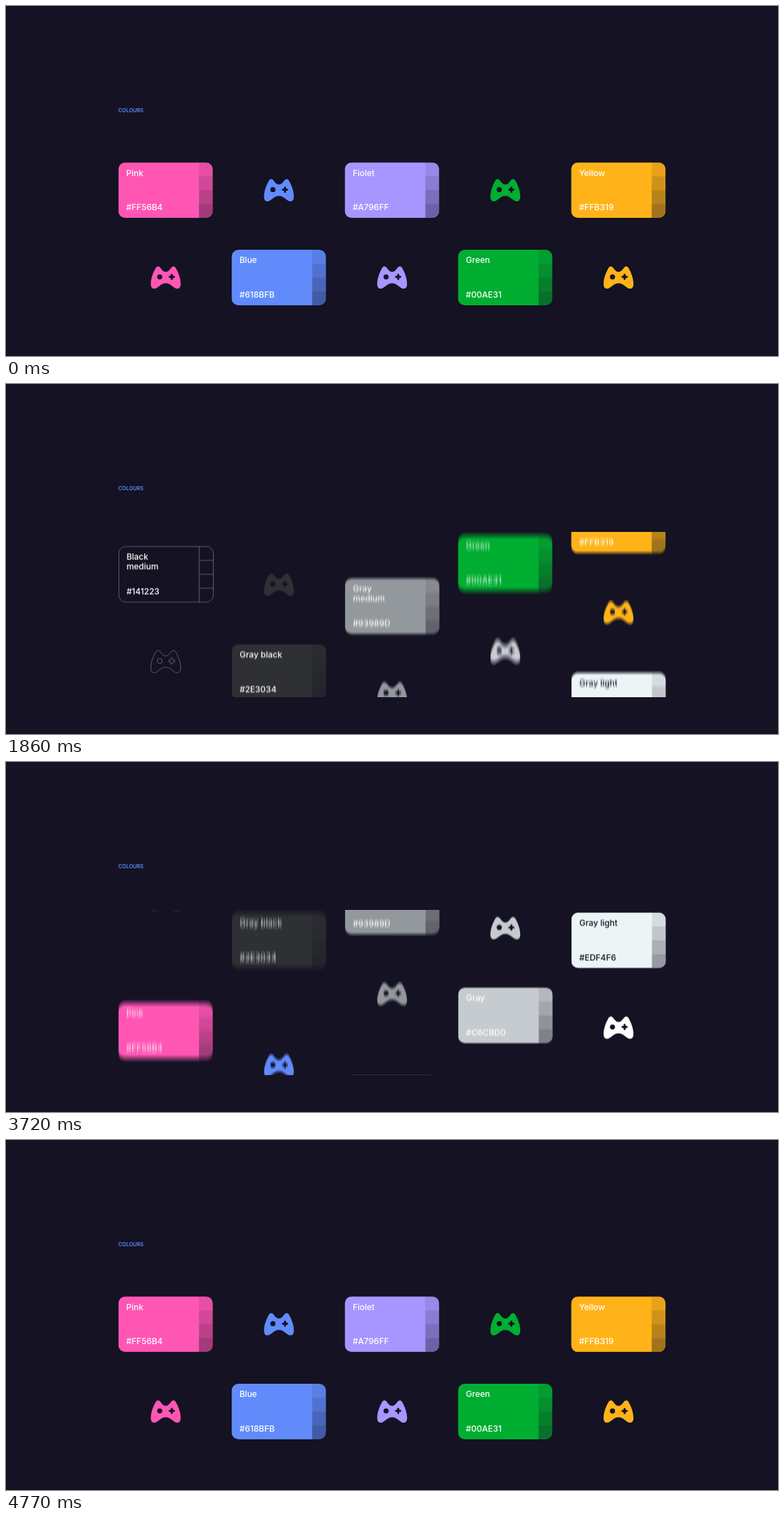
An HTML page for the animation above (4800 ms loop, 1111 px wide and 504 px high).

```html
<!DOCTYPE html>
<html lang="en">
<head>
<meta charset="utf-8">
<title>Colours</title>
<style>
  html, body { margin: 0; width: 100%; height: 100%; overflow: hidden; background: #141223; }
  svg { display: block; width: 1111px; height: 504px; }
  text { font: 500 12px Inter, "Open Sans", sans-serif; }
  .title { font-size: 7.5px; font-weight: 600; fill: #618bfb; }
  .line { fill: none; stroke: #77757f; stroke-width: .8; }
</style>
</head>
<body>
<svg viewBox="0 0 1111 504">
  <defs>
    <clipPath id="view"><rect x="150" y="213" width="811" height="237.4"/></clipPath>
    <clipPath id="round"><rect width="136" height="80" rx="10"/></clipPath>
    <path id="pad" fill-rule="evenodd" d="M0-8.2C4-8.2 6-12 8.4-14.8C10.4-16.7 13-16.4 14.4-13.8C18-7.6 21.5 1 21.5 9.2C21.5 14 19.4 16 16.4 16C11 16 8 8.2 0 8.2S-11 16-16.4 16C-19.4 16-21.5 14-21.5 9.2C-21.5 1-18-7.6-14.4-13.8C-13-16.4-10.4-16.7-8.4-14.8C-6-12-4-8.2 0-8.2Z
      M-12.4-.9a3.7 3.7 0 0 0 7.4 0a3.7 3.7 0 0 0-7.4 0Z
      M7.2-2.4V-3.9a1.5 1.5 0 0 1 3 0V-2.4H11.7a1.5 1.5 0 0 1 0 3H10.2V2.1a1.5 1.5 0 0 1-3 0V.6H5.7a1.5 1.5 0 0 1 0-3Z"/>
  </defs>
  <text class="title" x="161.6" y="153.4">COLOURS</text>
  <g id="stage" clip-path="url(#view)"></g>
</svg>
<script>
const LOOP = 4800, DURATION = 1200, STAGGER = 120, SHUTTER = 16, TAPS = 13;
const SWAP = 891, LEAVE = 3002, RETURN = 3115;   // start times of the three moves
const TRAVEL = 252;
const INK = '#141223';
const stage = document.getElementById('stage');

// name lines, hex, text colour
const bright = [
  [['Pink'], '#FF56B4', '#fff'],
  [['Blue'], '#618BFB', '#fff'],
  [['Fiolet'], '#A796FF', '#fff'],
  [['Green'], '#00AE31', '#fff'],
  [['Yellow'], '#FFB319', '#fff']
];
const neutral = [
  [['Black', 'medium'], '#141223', '#fff'],
  [['Gray black'], '#2E3034', '#fff'],
  [['Gray', 'medium'], '#93989D', '#fff'],
  [['Gray'], '#C6CBD0', '#fff'],
  [['Gray light'], '#EDF4F6', INK]
];

function add(parent, tag, attrs, text) {
  const el = document.createElementNS('http://www.w3.org/2000/svg', tag);
  for (const key in attrs) el.setAttribute(key, attrs[key]);
  if (text) el.textContent = text;
  parent.appendChild(el);
  return el;
}

function drawCard(parent, x, y, [lines, hex, ink]) {
  const card = add(parent, 'g', { transform: `translate(${x} ${y})` });
  if (hex === INK) {
    add(card, 'rect', { class: 'line', x: .4, width: 136, height: 80, rx: 10 });
    add(card, 'path', { class: 'line', d: 'M116 0V80M116 20H136.4M116 40H136.4M116 60H136.4' });
  } else {
    const body = add(card, 'g', { 'clip-path': 'url(#round)' });
    add(body, 'rect', { width: 136, height: 80, fill: hex });
    for (let i = 0; i < 4; i++)
      add(body, 'rect', { x: 116, y: i * 20, width: 20, height: 20, fill: INK, 'fill-opacity': (i + 1) / 10 });
  }
  lines.forEach((line, i) => add(card, 'text', { x: 11.4, y: 19.3 + i * 14, fill: ink }, line));
  add(card, 'text', { x: 11.4, y: 69.1, fill: ink }, hex);
}

function drawPad(parent, x, y, hex) {
  const look = hex === INK ? { class: 'line' } : { fill: hex === '#EDF4F6' ? '#fff' : hex };
  add(parent, 'use', { href: '#pad', transform: `translate(${x} ${y})`, ...look });
}

function makeColumn(item, col, page) {
  const x = 161.7 + 162.9 * col;
  const rows = col % 2 ? [351, 225.3] : [225.3, 351];
  const shift = page * .5;
  const id = `blur${page}${col}`;
  const filter = add(document.querySelector('defs'), 'filter', {
    id, filterUnits: 'userSpaceOnUse', x: x - 8, y: 190, width: 154, height: 284,
    'color-interpolation-filters': 'sRGB'
  });
  const kernel = add(filter, 'feConvolveMatrix', {
    order: `1 ${TAPS}`, kernelMatrix: blurKernel(1), edgeMode: 'none', preserveAlpha: 'false'
  });
  const outer = add(stage, 'g', {});
  const inner = add(outer, 'g', {});
  drawCard(inner, x + (page ? .3 : 0), rows[0] + shift, item);
  drawPad(inner, x + 68.2, rows[1] + 40 + shift, item[1]);
  return { col, page, id, kernel, outer, inner };
}

// Vertical box of a fractional length, spread over the taps
function blurKernel(size) {
  const taps = [];
  for (let i = 0; i < TAPS; i++) {
    const d = Math.abs(i - (TAPS - 1) / 2);
    const cover = Math.min(size / 2, d + .5) - Math.max(-size / 2, d - .5);
    taps.push((Math.max(0, cover) / size).toFixed(4));
  }
  return taps.join(' ');
}

// cubic-bezier(.7, 0, .3, 1)
function ease(x) {
  if (x <= 0) return 0;
  if (x >= 1) return 1;
  let lo = 0, hi = 1;
  for (let i = 0; i < 24; i++) {
    const s = (lo + hi) / 2, r = 1 - s;
    if (2.1 * s * r * r + .9 * s * s * r + s * s * s < x) lo = s; else hi = s;
  }
  return lo * lo * (3 - 2 * lo);
}

function position(t, col, page) {
  const run = start => ease((t - start - col * STAGGER) / DURATION);
  if (t < 2800) return TRAVEL * (page - run(SWAP));
  const low = col % 2;   // columns whose card sits in the lower row
  return page
    ? -(TRAVEL + low * 19) * run(LEAVE)
    : (TRAVEL - low * 26) * (1 - run(RETURN));
}

const columns = [bright, neutral].flatMap((items, page) =>
  items.map((item, col) => makeColumn(item, col, page)));

function render(t) {
  for (const c of columns) {
    const y = position(t, c.col, c.page);
    const visible = Math.abs(y) < 240;
    c.outer.setAttribute('display', visible ? 'inline' : 'none');
    if (!visible) continue;
    c.inner.setAttribute('transform', `translate(0 ${y.toFixed(3)})`);
    const size = Math.abs(position(t + SHUTTER / 2, c.col, c.page) - position(t - SHUTTER / 2, c.col, c.page));
    if (size > 1.05) {
      c.kernel.setAttribute('kernelMatrix', blurKernel(Math.min(size, TAPS)));
      c.outer.setAttribute('filter', `url(#${c.id})`);
    } else {
      c.outer.removeAttribute('filter');
    }
  }
}

const began = performance.now();
function tick() {
  render((performance.now() - began) % LOOP);
  requestAnimationFrame(tick);
}
render(0);
requestAnimationFrame(tick);
</script>
</body>
</html>
```
